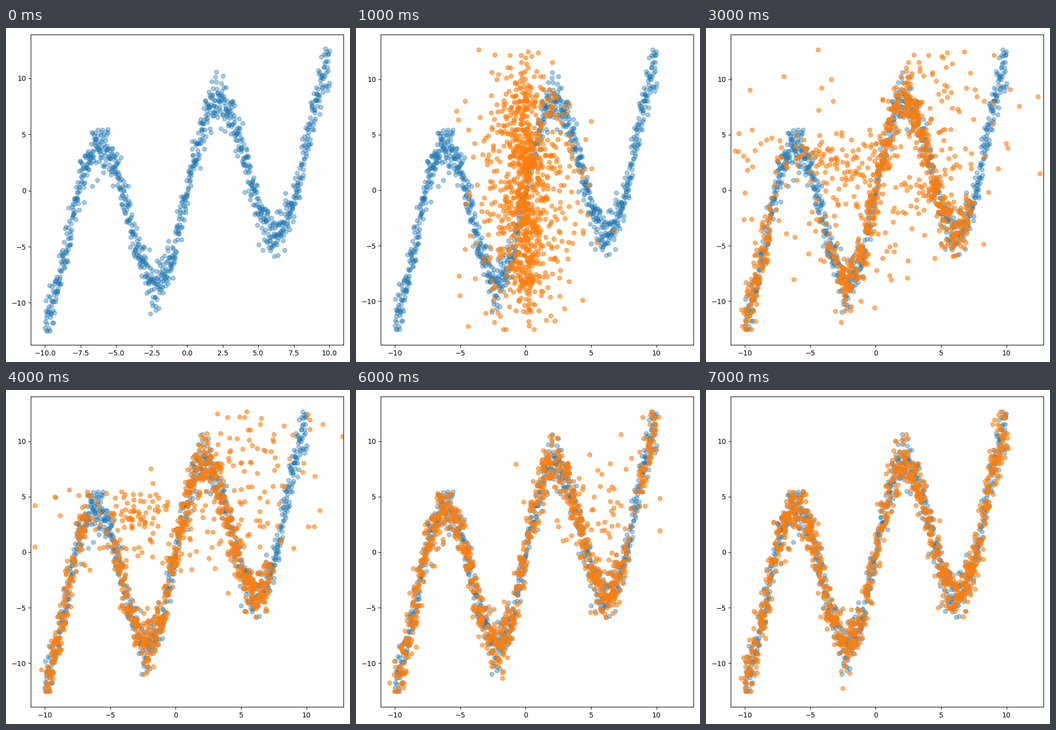
A matplotlib script for the animation above (8000 ms loop, 682 by 663 pixels).

```python
import numpy as np
import matplotlib.pyplot as plt
from matplotlib.animation import FuncAnimation

W, H, DPI = 682, 663, 100
FRAMES, STEP_MS, COUNT = 8, 1000, 1000
Y_MIN, Y_MAX = -12.5, 12.64


def curve_data():
    rng = np.random.default_rng(4)
    x = np.linspace(-10, 10, COUNT)
    y = 7 * np.sin(.75 * x) + .5 * x + rng.normal(size=COUNT)
    return x, np.clip(y, Y_MIN, Y_MAX)


def learned_share(x, epoch):
    """The central wave is learned first, then both ends, then the rest."""
    learned_at = np.interp(x, [-10, -8, -6, -2, 2, 4.3, 7, 8, 10],
                           [2.2, 2.8, 5.2, 1.8, 1.4, 1.6, 2.7, 6.7, 4.8])
    return 1 / (1 + np.exp(5 * (learned_at - epoch)))


def predict(x, y, epoch):
    """Sample an x for every y from the partly trained model."""
    rng = np.random.default_rng(epoch)

    # The perfect model returns the x of a point at about the same height.
    order = np.argsort(y)
    ranks = np.arange(COUNT) + rng.integers(-12, 13, COUNT)
    ideal = np.empty(COUNT)
    ideal[order] = x[order[np.clip(ranks, 0, COUNT - 1)]]

    # Loose guesses start at zero, scatter widely and drift to the curve.
    age = epoch - 1
    centre = ideal * (1 - np.exp(-age / 4))
    spread = 1.1 + 5 * age * np.exp(-.84 * age)
    loose = rng.random(COUNT) > learned_share(ideal, epoch)
    guess = np.where(loose, rng.laplace(centre, spread),
                     rng.normal(ideal, .2))
    return np.column_stack([guess, y])


fig = plt.figure(figsize=(W / DPI, H / DPI), dpi=DPI)
ax = fig.add_axes([49.3 / W, 33.9 / H, 620 / W, 616 / H])
xs, ys = curve_data()
ax.scatter(xs, ys, alpha=.4, color="C0")
dots = ax.scatter([], [], alpha=.6, color="C1")
clouds = [np.empty((0, 2))] + [predict(xs, ys, e) for e in range(1, FRAMES)]


def draw(i):
    dots.set_offsets(clouds[i])
    if i == 0:
        ax.set(xlim=(-11, 11), ylim=(-13.76, 13.9))
    else:
        ax.set(xlim=(-11.08, 12.84), ylim=(-13.93, 14.01))
    return [dots]


anim = FuncAnimation(fig, draw, frames=FRAMES, interval=STEP_MS,
                     init_func=lambda: draw(0), repeat=True, repeat_delay=0)
plt.show()
```
